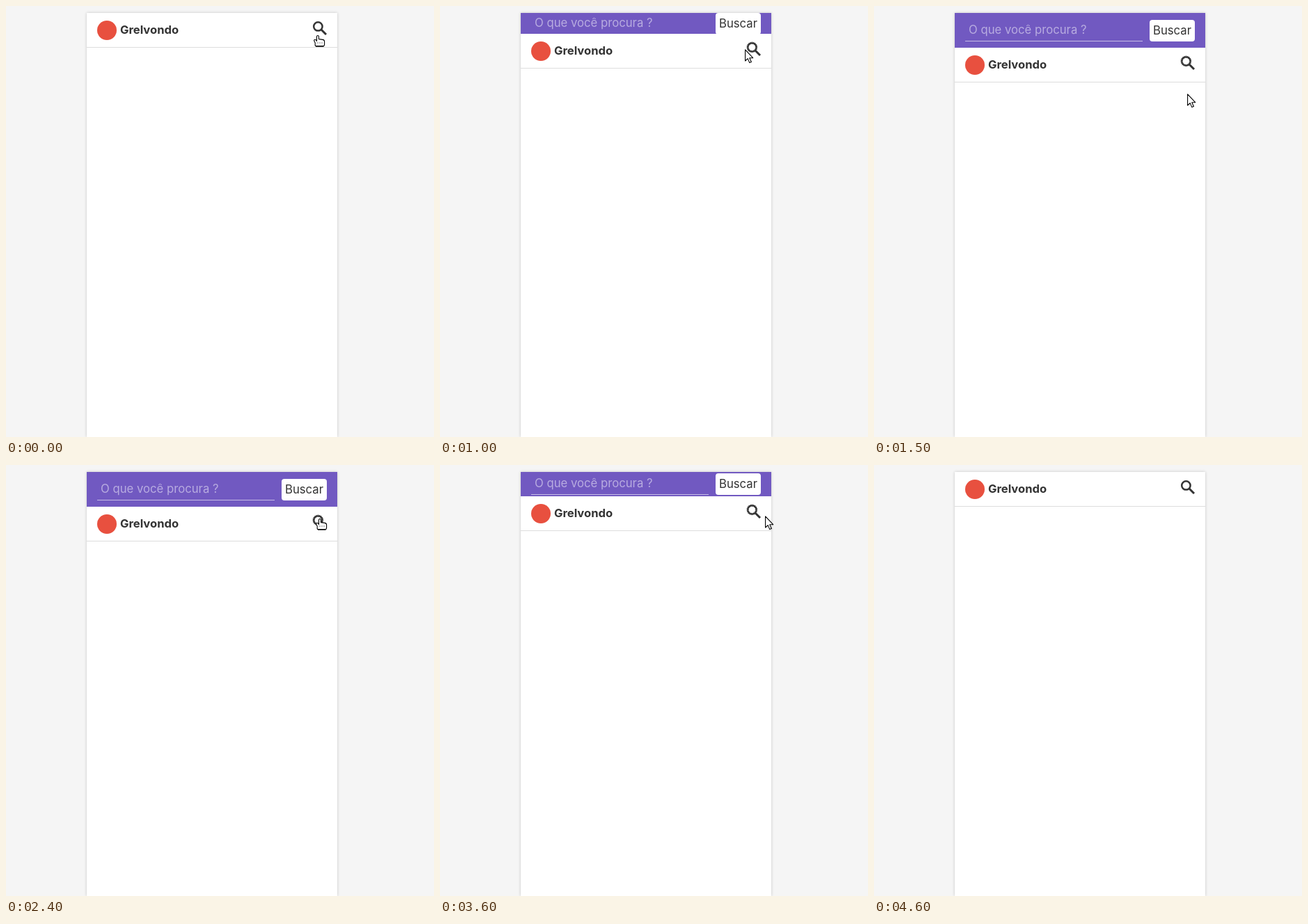
Recreate the animation shown at these times as an HTML page. Size 615 by 620 pixels, loop 4.9 s.

```html
<!DOCTYPE html>
<html lang="pt">
<head>
<meta charset="utf-8">
<title>Search bar</title>
<style>
html, body { margin: 0; width: 100%; height: 100%; overflow: hidden; background: #f5f5f5; }
#panel { position: absolute; left: 116px; top: 10px; bottom: 0; width: 360px; background: #fff; box-shadow: 0 0 4px rgba(0, 0, 0, .2); }
svg { position: absolute; left: 0; top: 0; width: 100%; height: 100%; }
text { font: 400 16.7px Inter, "Open Sans", sans-serif; fill: #333; }
.brand { font-size: 16.6px; font-weight: 700; }
.hint { fill: #b8ace0; }
.lens { fill: none; stroke: #333; }
.cursor { fill: #fff; stroke: #000; stroke-width: 1.1; stroke-linejoin: round; }
</style>
</head>
<body>
<div id="panel"></div>
<svg>
  <clipPath id="clip"><rect id="clipBox" x="116" y="10" width="360" height="50"/></clipPath>
  <g clip-path="url(#clip)">
    <rect x="116" y="10" width="360" height="50" fill="#7159c1"/>
    <g id="form">
      <text class="hint" x="136" y="40">O que você procura ?</text>
      <rect x="131" y="50" width="255" height="1" fill="#c6bce6"/>
      <rect x="396" y="20" width="65" height="31" rx="4" fill="#fff"/>
      <text x="401" y="41">Buscar</text>
    </g>
  </g>
  <g id="header">
    <rect x="116" y="59" width="360" height="1" fill="#ddd"/>
    <circle cx="145" cy="35" r="14" fill="#e8503f"/>
    <text class="brand" x="164" y="40">Grelvondo</text>
    <g class="lens" transform="translate(441 22)">
      <path d="M12 12L19 19" stroke-width="3"/>
      <circle id="ring" cx="7.4" cy="7.4" r="6.2" stroke-width="2.5"/>
      <circle id="notches" cx="7.4" cy="7.4" r="6.2" stroke-width="3.4" stroke-dasharray="1 1"/>
    </g>
  </g>
  <g id="hand" class="cursor">
    <path d="M4.5 8.6V2a1.5 1.5 0 0 1 3 0V5.6L13 6.4q2.6.4 2.6 2.6V13.5q0 2-1.6 2H3.4q-1.2 0-1.2-1.6V11L.7 8Q.7 6.2 2.2 6.3Q3.6 6.6 4.5 8.6Z"/>
    <path d="M5.5 11H14" stroke-dasharray="1 2"/>
    <path d="M3 16H14.6" stroke-width="1.4"/>
  </g>
  <path id="arrow" class="cursor" d="M.6.8V17l3.6-3.4 2.6 6 2.6-1.1-2.6-5.8H11.7Z"/>
</svg>
<script>
const LOOP = 4900, STEP = 100, OPEN = 860, CLOSE = 3520, SLIDE = 400;

// [start, shape, x, y]
const moves = [
  [0, "hand", 442, 42], [200, "hand", 443, 40], [300, "hand", 444, 38],
  [1000, "arrow", 438, 62], [1100, "arrow", 428, 91], [1200, "arrow", 438, 118],
  [1300, "arrow", 452, 131], [1400, "arrow", 458, 132], [1500, "arrow", 450, 126],
  [1600, "arrow", 453, 114], [1700, "arrow", 452, 98], [1800, "hand", 447, 80],
  [1900, "hand", 446, 77], [2400, "hand", 445, 77], [3400, "hand", 448, 77],
  [3500, "arrow", 460, 76], [3600, "arrow", 467, 73], [3700, "arrow", 470, 68],
  [3800, "none", 0, 0]
];

const $ = id => document.getElementById(id);
const show = (id, on) => $(id).setAttribute("display", on ? "inline" : "none");
const place = (id, x, y) => $(id).setAttribute("transform", `translate(${x} ${y})`);
const bezier = (a, b, u) => 3 * a * u * (1 - u) ** 2 + 3 * b * u * u * (1 - u) + u ** 3;

function ease(x) {
  if (x <= 0) return 0;
  if (x >= 1) return 1;
  let lo = 0, hi = 1;
  for (let i = 0; i < 25; i++) {
    const mid = (lo + hi) / 2;
    if (bezier(.25, .25, mid) < x) lo = mid; else hi = mid;
  }
  return bezier(.1, 1, lo);
}

function draw(now) {
  const t = Math.floor(now % LOOP / STEP) * STEP;
  const height = Math.round(50 * (ease((t - OPEN) / SLIDE) - ease((t - CLOSE) / SLIDE)));
  $("clipBox").setAttribute("height", height);
  place("form", 0, Math.floor((height - 50) / 2));
  place("header", 0, height);

  const rough = t >= 500 && t < 4600;
  show("notches", rough);
  $("ring").setAttribute("stroke-width", rough ? 2 : 2.5);

  const [, shape, x, y] = moves.findLast(m => m[0] <= t);
  for (const id of ["hand", "arrow"]) {
    show(id, id === shape);
    place(id, x, y);
  }
}

const start = performance.now();
function tick() {
  draw(performance.now() - start);
  requestAnimationFrame(tick);
}
tick();
</script>
</body>
</html>
```
